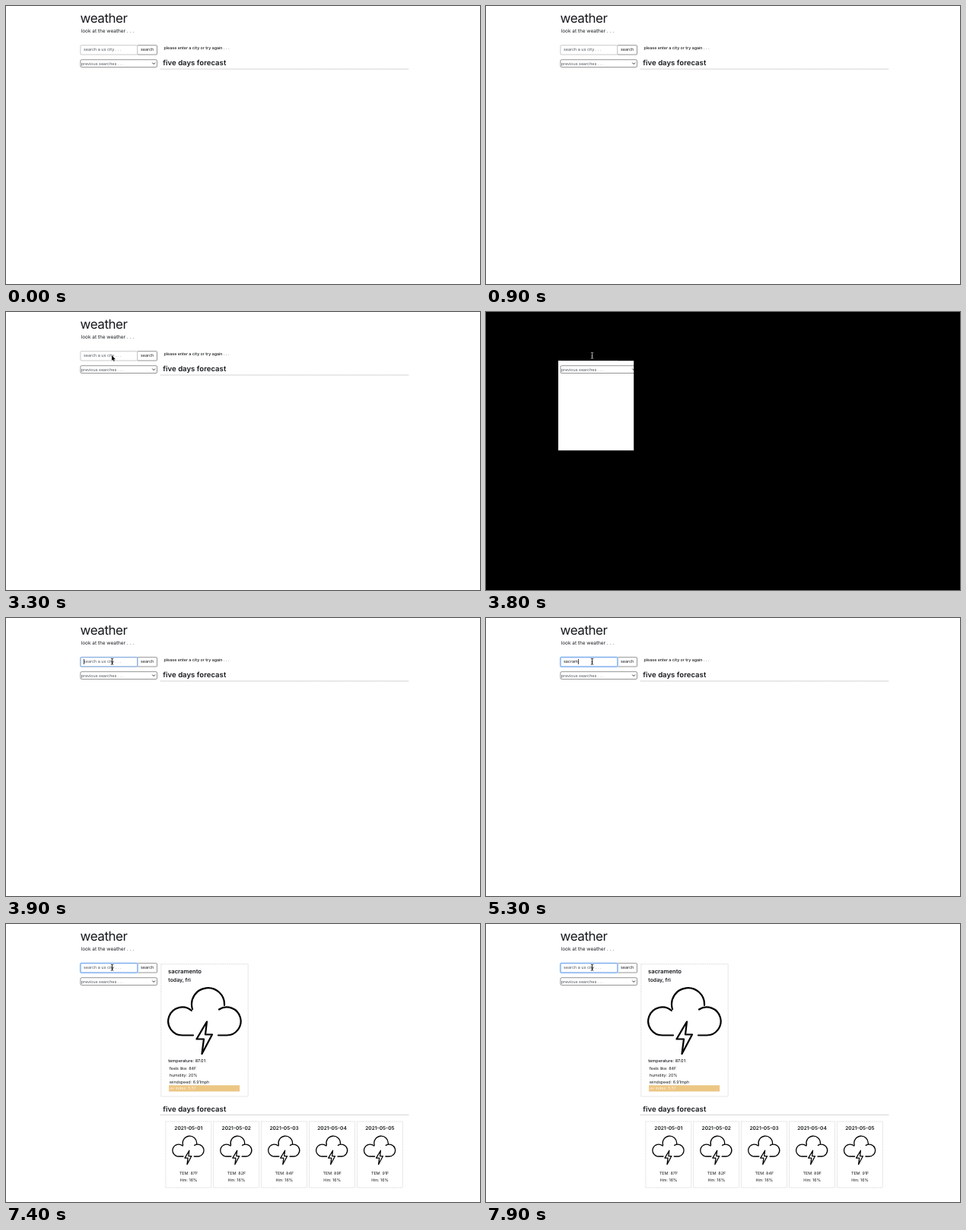
Recreate the animation shown at these times as an HTML page. Size 623x366 px, loop 8 s.

```html
<!DOCTYPE html>
<html lang="en">
<head>
<meta charset="utf-8">
<title>weather</title>
<style>
  html, body { margin: 0; width: 100%; height: 100%; overflow: hidden; background: #fff; }
  svg { display: block; }
  text { font: 5.4px Inter, Roboto, sans-serif; fill: #16191c; text-rendering: geometricPrecision; white-space: pre; }
  .title { font-size: 17px; letter-spacing: -.45px; }
  .lead { font-size: 6.45px; }
  .bold { font-weight: 600; }
  .mid { font-weight: 500; }
  .hint { fill: #50565c; }
  .center { text-anchor: middle; }
  .box { fill: none; stroke: #666; stroke-width: .7; }
  .card { fill: none; stroke: #d9d9d9; stroke-width: .8; stroke-dasharray: 2 .7; }
  .icon { fill: none; stroke: #000; stroke-linecap: round; stroke-linejoin: round; }
</style>
</head>
<body>
<svg width="623" height="366" viewBox="0 0 623 366">
  <defs>
    <g id="storm" class="icon">
      <path d="M246 146.500H231.800A18.500 18.500 0 1 1 243.800 114M245 112A21.500 21.500 0 1 1 287 107M280 112.500A18.500 18.500 0 1 1 290 146.500H279"/>
      <path d="M264 128.500L250.500 151.500H260L257.500 171L271 145.500H262Z"/>
    </g>
  </defs>

  <text class="title" x="97.500" y="22">weather</text>
  <text class="lead" x="98.700" y="35.200">look at the weather . . .</text>

  <rect class="box" x="172.500" y="51.700" width="26" height="12.300" rx="1"/>
  <text x="177" y="59.400">search</text>
  <rect id="field" x="97.900" y="51.700" width="74.800" height="12.300" rx="1" fill="#fff" stroke="#bbb" stroke-width=".8"/>
  <g id="focus" fill="none">
    <rect id="glow" x="97.700" y="51.500" width="75.400" height="12.700" rx="1.500" stroke="#cbe1fb" stroke-width="2"/>
    <rect x="97.900" y="51.700" width="75" height="12.300" rx="1" stroke="#5f9be6" stroke-width=".8"/>
  </g>
  <text id="hint" class="hint" x="102" y="59.300">search a us city . . .</text>
  <text id="typed" x="102" y="59.300"></text>
  <rect id="caret" y="54" width=".8" height="7" fill="#111"/>

  <rect class="box" x="97.900" y="70.700" width="100.600" height="9.800" rx="1.500"/>
  <text class="hint" x="98.700" y="77.700">previous searches . . .</text>
  <path d="M192.300 74.600L194.200 76.600L196.100 74.600" fill="none" stroke="#333"/>

  <text id="message" class="mid" x="207.500" y="57.200" style="font-size:5.32px">please enter a city or try again . . .</text>
  <g id="heading">
    <text class="bold" x="206.300" y="78.300" style="font-size:9.6px">five days forecast</text>
    <path d="M203 83H529.500" stroke="#b5b5b5" stroke-width=".8" stroke-dasharray="1.500 .5"/>
  </g>

  <g id="results">
    <rect class="card" x="203.800" y="52.800" width="114.400" height="174.200"/>
    <text class="bold" x="213" y="65.300" style="font-size:7.7px">sacramento</text>
    <text class="bold" x="213.300" y="75.500" style="font-size:6.9px">today, fri</text>
    <use href="#storm" stroke-width="2.200"/>
    <text class="mid" x="213.300" y="182.300" style="font-size:5.5px">temperature: 87.01</text>
    <text x="214.700" y="191.500">feels like: 84F</text>
    <text x="214.700" y="200.500">humidity: 20%</text>
    <text x="214.700" y="209.500">windspeed: 6.91mph</text>
    <rect x="214" y="212.300" width="93.200" height="8.200" fill="#ecc683"/>
    <text x="214.700" y="218.300" style="fill:#fff6e5">uv index: 5.51</text>
  </g>

  <path id="blackout" fill-rule="evenodd" d="M0 0H623V366H0ZM95 64H194.200V182.300H95Z"/>
  <path id="beam" d="M137.900 53.200Q139.500 53.200 139.500 54.500Q139.500 53.200 141.100 53.200M139.500 54.500V60M137.900 61.300Q139.500 61.300 139.500 60Q139.500 61.300 141.100 61.300M138.500 57.800H140.500" fill="none" stroke-width=".9"/>
  <path id="arrow" d="M0 0V7L1.600 5.600L2.700 8.100L3.800 7.600L2.700 5.200H4.900Z" stroke="#fff" stroke-width="1" paint-order="stroke"/>
</svg>
<script>
const $ = id => document.getElementById(id);
const show = (id, on) => $(id).setAttribute('display', on ? 'inline' : 'none');

// Five forecast cards: temperature per day
$('results').innerHTML += [87, 82, 84, 89, 91].map((temp, i) => `
  <g transform="translate(${i * 62.9} 0)">
    <rect class="card" x="209.800" y="260" width="60" height="87"/>
    <text class="bold center" x="239.800" y="270.800" style="font-size:6.6px">2021-05-0${i + 1}</text>
    <use href="#storm" stroke-width="3" transform="translate(127.300 243) scale(.43)"/>
    <text class="center" x="240" y="329.600">TEM: ${temp}F</text>
    <text class="center" x="240" y="338.600">Hm: 16%</text>
  </g>`).join('');

const LOOP = 8000, CLICK = 3800, SUBMIT = 6800, LOADED = 7300;
const word = 'sacramento';
const keyTimes = [4200, 4500, 4600, 4800, 4900, 5300, 5500, 5700, 6200, 6300];
const route = [
  [1900, 490, 150], [2000, 502, 100], [2100, 400, 48], [2200, 315, 26], [2300, 261, 34],
  [2500, 180, 44], [2700, 139, 66], [2800, 138, 71], [3100, 139, 57], [CLICK, 139, 57]
];

function pointer(t) {
  const i = route.findIndex(p => p[0] > t);
  const [a, b] = [route[i - 1], route[i]];
  const k = (t - a[0]) / (b[0] - a[0]);
  return [1, 2].map(n => a[n] + (b[n] - a[n]) * k);
}

function draw(t) {
  const black = t >= CLICK && t < CLICK + 100;
  const focused = t >= CLICK + 100;
  const submitted = t >= SUBMIT;
  const loaded = t >= LOADED;
  const text = submitted ? '' : word.slice(0, keyTimes.filter(k => k <= t).length);
  const moving = t >= route[0][0] && t < CLICK;

  $('typed').textContent = text;
  $('caret').setAttribute('x', 102.2 + (text ? $('typed').getComputedTextLength() : 0));
  show('hint', !text);
  show('caret', focused && !loaded);
  show('focus', focused);
  show('glow', t >= 4200);
  show('message', !submitted);
  show('results', loaded);
  $('heading').setAttribute('transform', `translate(0 ${loaded ? 168.3 : submitted ? -8 : 0})`);

  show('blackout', black);
  show('beam', t >= CLICK);
  $('beam').setAttribute('stroke', black ? '#bbb' : '#111');
  show('arrow', moving);
  if (moving) $('arrow').setAttribute('transform', `translate(${pointer(t)})`);
}

const start = performance.now();
function tick() {
  const t = (performance.now() - start) % LOOP;
  draw(Math.floor(t / 100) * 100);
  requestAnimationFrame(tick);
}
tick();
</script>
</body>
</html>
```
